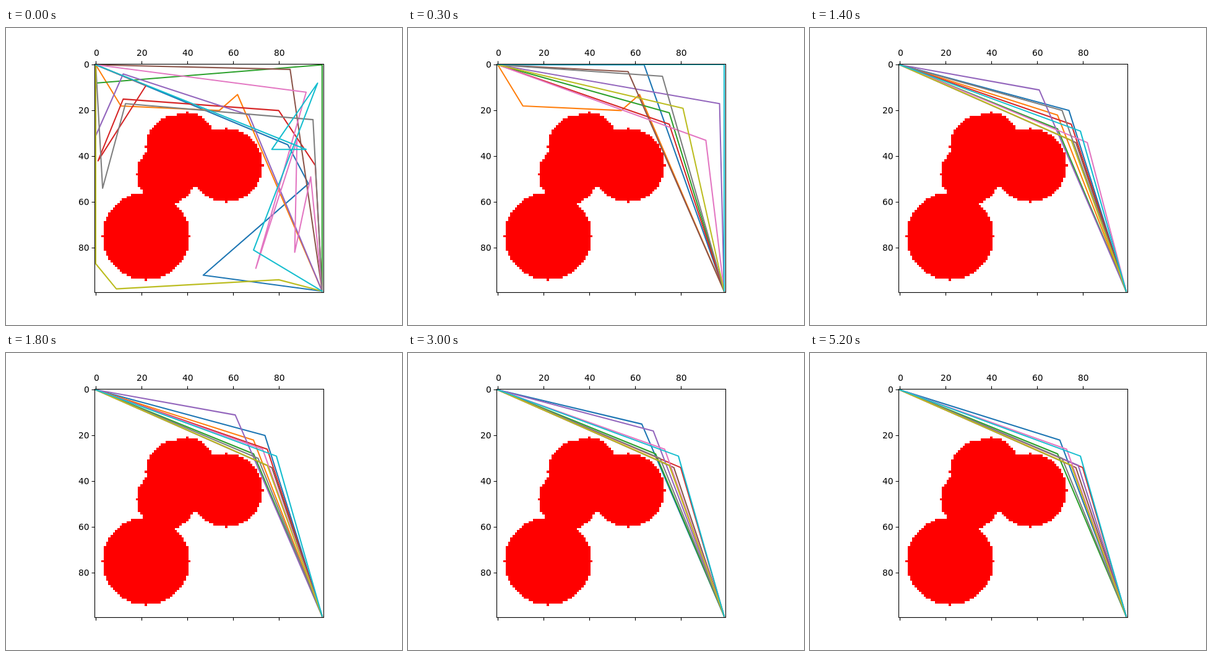
These frames come from a looping animation (640 by 480 pixels, 5900 ms). An HTML page with a canvas:

```html
<!DOCTYPE html>
<html lang="en">
<head>
<meta charset="utf-8">
<title>Path search around obstacles</title>
<style>
  html, body { margin: 0; width: 100%; height: 100%; overflow: hidden; background: #fff; }
  canvas { display: block; }
</style>
</head>
<body>
<canvas id="stage" width="640" height="480"></canvas>
<script>
const ctx = document.getElementById('stage').getContext('2d');

const LOOP = 5900;
const N = 100;
const GOAL = [99, 99];

// Plot area in pixels; the obstacle map is stretched to whole pixels
const AREA = { x: 143.2, y: 57.6, cell: 3.696 };
const MAP = { x: 143, y: 57, cell: 3.7 };
const px = x => AREA.x + (x + 0.5) * AREA.cell;
const py = y => AREA.y + (y + 0.5) * AREA.cell;

// Obstacles: centre x, centre y, radius
const DISCS = [[36, 36, 14], [40, 33, 12], [31, 48, 13], [57, 44, 16], [22, 75, 19]];

// rough: bends of the first guess; bests: single bends found one after another;
// settle: time of the last find
const AGENTS = [
  { color: '#1f77b4', rough: [[84, 35], [93, 52], [47, 92]],
    bests: [[64, 0], [74, 20], [63, 15], [70, 22]], settle: 4800 },
  { color: '#ff7f0e', rough: [[11, 18], [54, 20], [62, 13]],
    bests: [[60, 6], [69, 22], [75, 33]], first: 700, settle: 2000 },
  { color: '#2ca02c', rough: [[0, 8], [99, 0]],
    bests: [[75, 21], [69, 28]], settle: 900 },
  { color: '#d62728', rough: [[22, 9], [1, 42], [12, 15], [80, 20], [96, 44]],
    bests: [[75, 26], [80, 34]], settle: 3000 },
  { color: '#9467bd', rough: [[0, 31], [12, 4], [67, 22]],
    bests: [[97, 17], [85, 34], [61, 11], [68, 18], [78, 33]], settle: 5200 },
  { color: '#8c564b', rough: [[85, 2]],
    bests: [[57, 3], [77, 34]], settle: 1000 },
  { color: '#e377c2', rough: [[92, 12], [70, 89], [88, 33], [87, 82], [94, 49]],
    bests: [[91, 33], [82, 34], [73, 26]], settle: 1800 },
  { color: '#7f7f7f', rough: [[3, 54], [13, 17], [95, 24]],
    bests: [[72, 5], [71, 20], [71, 30]], settle: 1600 },
  { color: '#bcbd22', rough: [[0, 87], [9, 98], [80, 94]],
    bests: [[81, 19], [75, 33]], settle: 800 },
  { color: '#17becf', rough: [[92, 37], [77, 37], [97, 8], [69, 81]],
    bests: [[99, 0], [79, 29]], settle: 600 }
];

// Finds get rarer: their times grow by a constant factor, rounded to search rounds
function findTime({ bests, first = 300, settle }, i, k) {
  if (k === 0) return first - 100 * (i % 3);
  const t = first * (settle / first) ** (k / (bests.length - 1));
  const round = t < 950 ? 100 : 200;
  return Math.round(t / round) * round;
}

function routeAt(agent, i, t) {
  const k = agent.bests.findLastIndex((_, n) => findTime(agent, i, n) <= t);
  const bends = k < 0 ? agent.rough : [agent.bests[k]];
  return [[0, 0], ...bends, GOAL];
}

function drawObstacles() {
  ctx.fillStyle = '#f00';
  const edge = (origin, i) => Math.round(origin + i * MAP.cell);
  for (const [cx, cy, r] of DISCS) {
    for (let dy = -r; dy <= r; dy++) {
      const half = Math.floor(Math.sqrt(r * r - dy * dy));
      const x = edge(MAP.x, cx - half), y = edge(MAP.y, cy + dy);
      ctx.fillRect(x, y, edge(MAP.x, cx + half + 1) - x, edge(MAP.y, cy + dy + 1) - y);
    }
  }
}

function drawRoute(points, color) {
  // Routes made only of level and upright parts sit on whole pixels
  const square = points.every(([x, y], i) =>
    i === 0 || x === points[i - 1][0] || y === points[i - 1][1]);
  const fit = square ? Math.round : v => v;
  ctx.strokeStyle = color;
  ctx.beginPath();
  for (const [x, y] of points) ctx.lineTo(fit(px(x)), fit(py(y)));
  ctx.stroke();
}

function drawRoutes(t) {
  ctx.save();
  ctx.beginPath();
  ctx.rect(143, 58, 370, 369);
  ctx.clip();
  ctx.lineWidth = 2.083;
  ctx.lineJoin = 'round';
  ctx.lineCap = 'square';
  AGENTS.forEach((agent, i) => drawRoute(routeAt(agent, i, t), agent.color));
  ctx.restore();
}

function drawAxes() {
  const snap = v => Math.round(v) + 0.5;
  ctx.strokeStyle = ctx.fillStyle = '#000';
  ctx.lineWidth = 1.11;
  ctx.font = '13.89px "DejaVu Sans", sans-serif';
  ctx.strokeRect(143.5, 58.5, 370, 369);
  ctx.beginPath();
  for (let v = 0; v < N; v += 20) {
    const x = snap(px(v)), y = snap(py(v));
    ctx.moveTo(x, 58); ctx.lineTo(x, 53.5);
    ctx.moveTo(x, 428); ctx.lineTo(x, 432.5);
    ctx.moveTo(143, y); ctx.lineTo(138.5, y);
    const w = ctx.measureText(v).width;
    ctx.fillText(v, Math.round(px(v) + 1 - w / 2), 45);
    ctx.fillText(v, Math.round(135 - w), Math.round(py(v) + 5));
  }
  ctx.stroke();
}

function draw(t) {
  ctx.fillStyle = '#fff';
  ctx.fillRect(0, 0, 640, 480);
  drawObstacles();
  drawRoutes(t);
  drawAxes();
}

let begin = null;
function tick(now) {
  if (begin === null) begin = now;
  draw((now - begin) % LOOP);
  requestAnimationFrame(tick);
}
draw(0);
requestAnimationFrame(tick);
</script>
</body>
</html>
```
